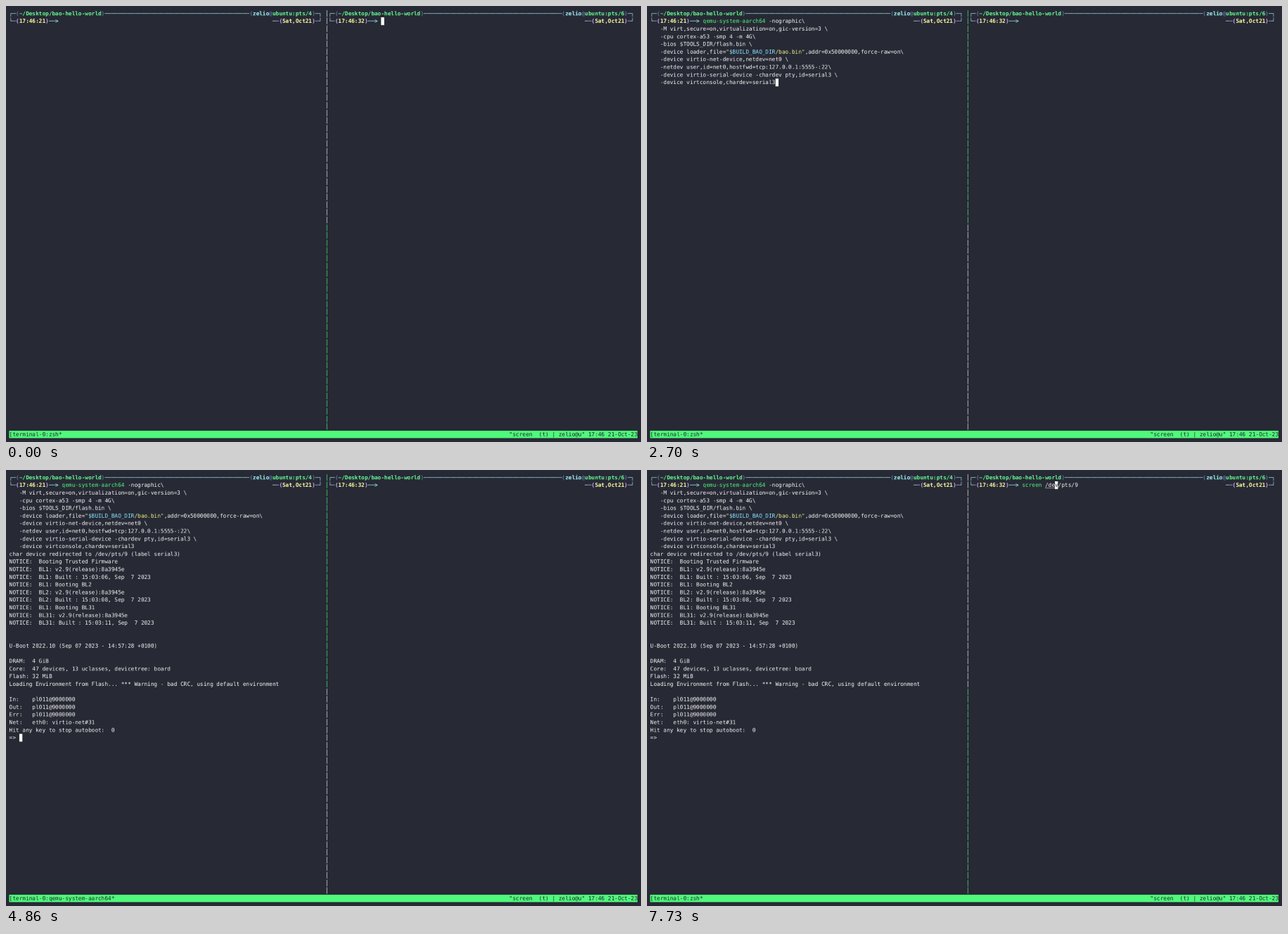
An HTML page with a canvas that plays this animation: 903x620 px, repeating every 8000 ms.

```html
<!DOCTYPE html>
<html lang="en">
<head>
<meta charset="utf-8">
<title>Terminal session</title>
<style>
html, body { margin: 0; width: 100%; height: 100%; overflow: hidden; background: #282a36; }
canvas { display: block; }
</style>
</head>
<body>
<canvas id="stage" width="903" height="620"></canvas>
<script>
const LOOP = 8000, COLS = 191, ROWS = 56, STATUS_ROW = 55, RIGHT = 97, PROMPT = 16;
const FONT_SIZE = 14, CELL_W = FONT_SIZE * 0.602, CELL_H = FONT_SIZE * 1.4;
const BG = '#282a36', FG = '#f8f8f2', BLACK = '#21222c';
const GREEN = '#50fa7b', CYAN = '#8be9fd', YELLOW = '#f1fa8c';
const BOLD = { green: '#69ff94', cyan: '#a4ffff', yellow: '#ffffa5', blue: '#d6acff', grey: '#6272a4', red: '#ff6e6e' };
const boldColors = new Set(Object.values(BOLD));

// The terminal is drawn on its own pixel grid, then scaled down to the stage.
const stage = document.getElementById('stage').getContext('2d');
const screen = document.createElement('canvas');
screen.width = Math.round((COLS + 2) * CELL_W);
screen.height = Math.round((ROWS + 1) * CELL_H);
const ctx = screen.getContext('2d');
ctx.textRendering = 'geometricPrecision';

// Time, column and row of each cursor move
const cursorMoves = [
  [0, 113, 1], [1480, 16, 1], [2090, 17, 1], [2180, 18, 1], [2700, 38, 9],
  [3870, 0, 10], [3930, 0, 25], [3980, 34, 27], [4060, 33, 33], [4860, 3, 34],
  [5890, 113, 1], [6310, 114, 1], [6400, 115, 1], [6610, 116, 1], [6690, 117, 1],
  [6870, 118, 1], [7120, 119, 1], [7290, 120, 1], [7470, 121, 1], [7680, 122, 1], [7730, 123, 1]
];

const program = 'qemu-system-aarch64';
const commandLines = [
  program + ' -nographic\\',
  '   -M virt,secure=on,virtualization=on,gic-version=3 \\',
  '   -cpu cortex-a53 -smp 4 -m 4G\\',
  '   -bios $TOOLS_DIR/flash.bin \\',
  '   -device loader,file="$BUILD_BAO_DIR/bao.bin",addr=0x50000000,force-raw=on\\',
  '   -device virtio-net-device,netdev=net0 \\',
  '   -netdev user,id=net0,hostfwd=tcp:127.0.0.1:5555-:22\\',
  '   -device virtio-serial-device -chardev pty,id=serial3 \\',
  '   -device virtconsole,chardev=serial3'
];
const screenCommand = 'screen /dev/pts/9';

const firmwareLog = [
  'char device redirected to /dev/pts/9 (label serial3)',
  'NOTICE:  Booting Trusted Firmware',
  'NOTICE:  BL1: v2.9(release):8a3945e',
  'NOTICE:  BL1: Built : 15:03:06, Sep  7 2023',
  'NOTICE:  BL1: Booting BL2',
  'NOTICE:  BL2: v2.9(release):8a3945e',
  'NOTICE:  BL2: Built : 15:03:08, Sep  7 2023',
  'NOTICE:  BL1: Booting BL31',
  'NOTICE:  BL31: v2.9(release):8a3945e',
  'NOTICE:  BL31: Built : 15:03:11, Sep  7 2023',
  '', '',
  'U-Boot 2022.10 (Sep 07 2023 - 14:57:28 +0100)',
  '',
  'DRAM:  4 GiB'
];
const deviceLog = [
  'Core:  47 devices, 13 uclasses, devicetree: board',
  'Flash: 32 MiB',
  'Loading Environment from Flash... '
];
const consoleLog = [
  '',
  'In:    pl011@9000000',
  'Out:   pl011@9000000',
  'Err:   pl011@9000000',
  'Net:   eth0: virtio-net#31'
];

let cells = {};
const cellX = col => Math.round((col + 1) * CELL_W);
const cellY = row => Math.round((row + 0.5) * CELL_H);

function fillCells(col, row, count, color) {
  ctx.fillStyle = color;
  ctx.fillRect(cellX(col), cellY(row), cellX(col + count) - cellX(col), cellY(row + 1) - cellY(row));
}

function write(col, row, text, color = FG) {
  ctx.font = `${boldColors.has(color) ? 'bold ' : ''}${FONT_SIZE}px "DejaVu Sans Mono", monospace`;
  ctx.fillStyle = color;
  for (const char of text) {
    cells[row * COLS + col] = char;
    ctx.fillText(char, cellX(col), cellY(row) + FONT_SIZE);
    col++;
  }
  return col;
}

function writeSpans(col, row, ...spans) {
  for (const [text, color] of spans) col = write(col, row, text, color);
}

function writeLines(row, lines) {
  lines.forEach((line, i) => write(0, row + i, line));
}

function drawPrompt(left, barLength, time, tty) {
  const { cyan, grey, green, blue, yellow } = BOLD;
  writeSpans(left, 0,
    ['┌─', cyan], ['(', grey], ['~/Desktop/bao-hello-world', green], [')', grey],
    ['─'.repeat(barLength), cyan], ['(', grey], ['zelio', cyan], ['@', grey],
    ['ubuntu:pts/' + tty, green], [')', grey], ['─┐', cyan]);
  writeSpans(left, 1, ['└', cyan], ['─(', blue], [time, yellow], [')', blue], ['──>', cyan]);
  writeSpans(left ? 175 : 80, 1,
    ['─', cyan], ['─(', blue], ['Sat,Oct21', yellow], [')─', blue], ['┘', cyan]);
}

function drawLeftCommand(t, cursorCol) {
  if (t < 2090) return;
  const accepted = t >= 2700;
  const typed = accepted ? program.length : cursorCol - PROMPT;
  writeSpans(PROMPT, 1,
    [commandLines[0].slice(0, typed), accepted ? GREEN : BOLD.red],
    [commandLines[0].slice(typed), FG]);
  commandLines.slice(1).forEach((line, i) => {
    const [before, quoted, after] = line.split('"');
    if (!accepted || !quoted) return write(0, i + 2, line);
    const [variable, file] = quoted.split('/');
    writeSpans(0, i + 2, [before, FG], ['"', YELLOW], [variable, CYAN],
      ['/' + file + '"', YELLOW], [after, FG]);
  });
}

function drawLog(t) {
  if (t >= 3930) writeLines(10, firmwareLog);
  if (t >= 3980) writeLines(25, deviceLog);
  if (t >= 4060) {
    write(34, 27, '*** Warning - bad CRC, using default environment');
    writeLines(28, consoleLog);
    write(0, 33, 'Hit any key to stop autoboot:  ' + (t < 4860 ? 2 : 0));
  }
  if (t >= 4860) write(0, 34, '=>');
}

function drawRightCommand(typed) {
  if (typed <= 0) return;
  const start = RIGHT + PROMPT;
  const word = Math.min(typed, 6);
  writeSpans(start, 1,
    [screenCommand.slice(0, word), word === 6 ? GREEN : BOLD.red],
    [screenCommand.slice(word), FG]);
  if (typed > 7) {
    const x = cellX(start + 7);
    ctx.fillStyle = FG;
    ctx.fillRect(x, cellY(1) + Math.round(FONT_SIZE * 1.2), cellX(start + typed) - x, 1);
  }
}

function drawScreen([t, cursorCol, cursorRow]) {
  const leftActive = t >= 1480 && t < 5890;
  cells = {};
  ctx.fillStyle = BG;
  ctx.fillRect(0, 0, screen.width, screen.height);

  drawPrompt(0, 44, '17:46:21', 4);
  drawPrompt(RIGHT, 42, '17:46:32', 6);
  for (let row = 0; row < STATUS_ROW; row++) {
    write(RIGHT - 1, row, '│', (row < 28) === leftActive ? GREEN : FG);
  }
  drawLeftCommand(t, cursorCol);
  drawLog(t);
  if (t >= 5890) drawRightCommand(cursorCol - RIGHT - PROMPT);

  fillCells(0, STATUS_ROW, COLS, GREEN);
  write(0, STATUS_ROW, `[terminal-0:${t >= 4860 && t < 5890 ? program : 'zsh'}*`, BLACK);
  write(152, STATUS_ROW, '"screen  (t) | zelio@u" 17:46 21-Oct-23', BLACK);

  const covered = cells[cursorRow * COLS + cursorCol] || ' ';
  fillCells(cursorCol, cursorRow, 1, FG);
  write(cursorCol, cursorRow, covered, BG);
}

// Averages four slightly shifted copies, so thin lines keep an even weight.
function showScreen() {
  const { width, height } = stage.canvas;
  const shift = 0.2;
  stage.imageSmoothingQuality = 'low';
  stage.globalAlpha = 1;
  stage.fillStyle = BG;
  stage.fillRect(0, 0, width, height);
  [[-1, -1], [1, -1], [-1, 1], [1, 1]].forEach(([dx, dy], i) => {
    stage.globalAlpha = 1 / (i + 1);
    stage.drawImage(screen, dx * shift, dy * shift, width, height);
  });
}

const startTime = performance.now();
let shownMove;
function tick() {
  const t = (performance.now() - startTime) % LOOP;
  const move = cursorMoves.findLast(([time]) => time <= t);
  if (move !== shownMove) {
    drawScreen(move);
    showScreen();
    shownMove = move;
  }
  requestAnimationFrame(tick);
}
tick();
</script>
</body>
</html>
```
